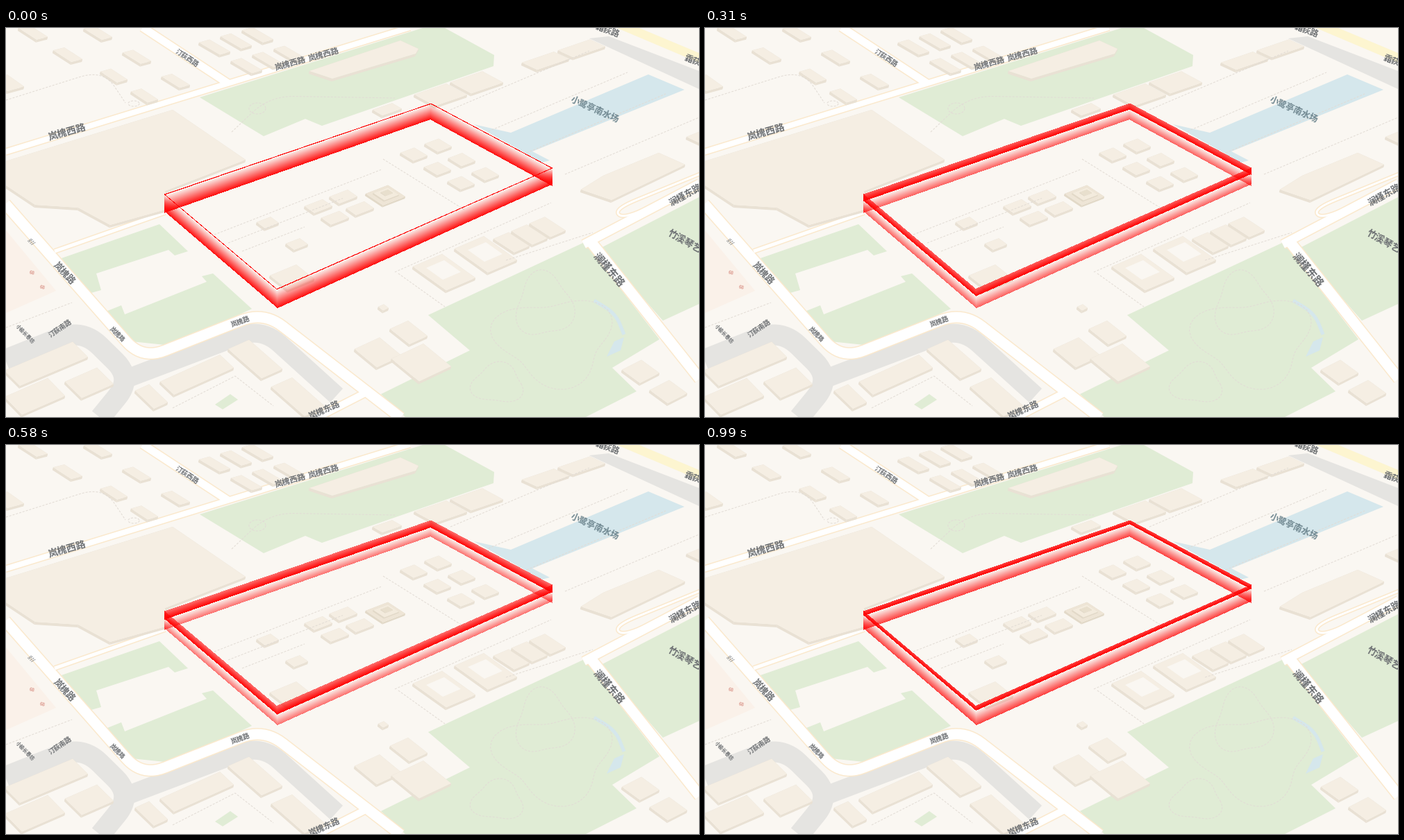
Animation of 998 by 561 pixels, one loop 1060 ms. Source, as a matplotlib script:

```python
import numpy as np
import matplotlib.pyplot as plt
from matplotlib.animation import FuncAnimation
from matplotlib.collections import PolyCollection

W, H, DPI = 998, 561, 100
PT = 72 / DPI
LOOP, TICK = 1060, 10

LAND, GREEN, WATER = "#faf7f2", "#e0ecd5", "#d5e7ec"
ROOF, SIDE, GREY = "#f5eee3", "#e9e1d4", "#e5e4e1"
EDGE, PATH, INK = "#fbe9cd", "#e2dcd5", "#6c6f72"

fig = plt.figure(figsize=(W / DPI, H / DPI), dpi=DPI, facecolor=LAND)
ax = fig.add_axes([0, 0, 1, 1])
ax.set_axis_off()
rng = np.random.default_rng(4)


def area(color, *points):
    ax.fill(*zip(*points), color=color, lw=0, zorder=1)


def rounded(points, radius=35):
    """Polyline whose inner corners are replaced by quadratic curves."""
    points = np.array(points, float)
    path = [points[0]]
    t = np.linspace(0, 1, 12)[:, None]
    for before, corner, after in zip(points, points[1:], points[2:]):
        a, b = (corner + (p - corner) * min(0.5, radius / np.hypot(*(p - corner)))
                for p in (before, after))
        path.extend((1 - t) ** 2 * a + 2 * t * (1 - t) * corner + t ** 2 * b)
    return path + [points[-1]]


def stroke(points, width, color, z, dash=None):
    ax.plot(*zip(*points), color=color, lw=width * PT, zorder=z,
            solid_joinstyle="round", solid_capstyle="butt",
            ls=(0, dash) if dash else "-")


def road(width, *points):
    path = rounded(points)
    stroke(path, width + 3, EDGE, 2)
    stroke(path, width, "white", 3)


def footpath(*points):
    stroke(points, 1, PATH, 5, (3, 2))


def loop_path(x, y, rx, ry, wobble=0.0):
    turn = np.linspace(0, 2 * np.pi, 50)
    r = 1 + wobble * np.sin(3 * turn + rng.uniform(0, 6))
    footpath(*zip(x + rx * r * np.cos(turn), y + ry * r * np.sin(turn)))


def label(x, y, text, size, angle, color=INK):
    ax.text(x, y, text, fontsize=size * PT, rotation=angle, color=color,
            family="Noto Sans CJK JP", weight="bold", ha="center", va="center",
            rotation_mode="anchor", zorder=6, clip_on=True)


def raised(*shapes, roof=ROOF, side=SIDE, drop=(-1, 4)):
    """Flat roofs with their side walls showing below."""
    polys, colors = [], []
    for shape in shapes:
        top = np.asarray(shape, float)
        for p, q in zip(top, np.roll(top, -1, axis=0)):
            polys.append([p, q, q + drop, p + drop])
            colors.append(side)
        polys.append(top)
        colors.append(roof)
    ax.add_collection(PolyCollection(polys, facecolors=colors, lw=0, zorder=4))


def estate(x, y, a, b, cols=1, rows=1, gap=0, **style):
    """Grid of equal blocks on the tilted street directions."""
    origin = np.array([x, y], float)
    u = np.array([1, -(0.25 + 0.00035 * y + 0.0001 * x)])
    v = np.array([1, 0.65 + 0.0007 * y - 0.0003 * x])
    corners = [origin + i * (a + gap) * u + j * (b + gap) * v
               for j in range(rows) for i in range(cols)]
    raised(*([p, p + a * u, p + a * u + b * v, p + b * v] for p in corners), **style)


# Parks, water and paved ground
area(GREEN, (279, 100), (600, 0), (632, 0), (703, 39), (702, 55), (455, 141),
     (431, 131), (371, 156))
area(GREEN, (80, 332), (221, 283), (262, 322), (243, 328), (234, 320),
     (130, 354), (137, 378), (119, 383))
area(GREEN, (146, 408), (166, 400), (171, 413), (289, 366), (282, 358),
     (298, 354), (354, 405), (238, 458), (181, 452))
area(GREEN, (608, 414), (833, 309), (941, 449), (873, 490), (908, 524),
     (835, 561), (575, 561), (540, 528), (668, 465))
area(GREEN, (855, 318), (998, 244), (998, 398), (946, 422))
area(GREEN, (301, 543), (323, 528), (334, 536), (312, 550))
area(WATER, (674, 139), (727, 151), (925, 67), (977, 89), (758, 178),
     (783, 191), (772, 194))
area(WATER, (876, 452), (890, 446), (885, 465), (865, 474))
stroke(rounded([(847, 393), (878, 412), (890, 442)]), 5, WATER, 2)
area("#faf1e9", (0, 292), (72, 379), (0, 411))
area(GREY, (840, 15), (868, 12), (998, 62), (998, 88))
area("#fdf5d0", (880, 0), (912, 0), (998, 36), (998, 50))
stroke(rounded([(-10, 482), (110, 434), (182, 505), (125, 575)]), 30, GREY, 1)
stroke(rounded([(178, 504), (368, 432), (476, 530)]), 27, GREY, 1)

# Streets
road(8, (-5, 180), (585, -2))
road(11, (192, -4), (320, 80))
road(15, (-5, 249), (196, 478), (371, 409), (580, 571))
road(5, (70, 322), (229, 266))
road(12, (832, 312), (1003, 222))
road(15, (842, 308), (1003, 511))
road(3, (1003, 209), (876, 261), (888, 276), (965, 240))
road(10, (520, 525), (440, 566))

# Buildings, north to south
raised([(0, 192), (240, 118), (345, 190), (229, 235), (229, 262), (150, 284),
        (104, 259), (42, 255), (0, 227)],
       [(437, 62), (568, 18), (594, 30), (590, 37), (470, 73)],
       [(828, 233), (860, 213), (940, 180), (978, 197), (872, 248)])
estate(18, 0, 16, 26, rows=2, gap=24)
estate(112, 1, 15, 26, rows=3, gap=30)
estate(136, 63, 15, 24, rows=2, gap=20)
estate(278, 21, 15, 30, cols=3, rows=2, gap=16)
estate(-22, 74, 24, 24)
estate(743, 50, 46, 22, cols=2, gap=6)
estate(528, 118, 28, 14)
estate(588, 96, 46, 30, cols=2, gap=6)
estate(980, 157, 30, 20)

estate(568, 180, 20, 19, cols=2, rows=3, gap=15)
estate(430, 257, 26, 14, cols=2, rows=2, gap=10)
estate(361, 280, 20, 12, rows=2, gap=30)
estate(380, 357, 38, 26)
for inset, tone in zip((0, 1, 2), ("#eee5d6", "#f3ebdd", "#e8dfcd")):
    estate(518 + 11 * inset, 239 - inset, 32 - 11 * inset, 25 - 9 * inset,
           roof=tone, side="#e2d9c8", drop=(-1, 3 - inset))

estate(586, 344, 42, 48, cols=2, gap=18)
estate(605, 346, 26, 24, cols=2, gap=34, roof=LAND, side=LAND, drop=(0, 0))
estate(702, 304, 22, 30, cols=3, gap=4)
estate(536, 402, 8, 7)
estate(553, 434, 26, 28)
estate(502, 463, 36, 32)
estate(555, 477, 46, 40)
estate(887, 493, 28, 26, rows=2, gap=14)

estate(-2, 494, 98, 22)
estate(-2, 532, 62, 25)
estate(85, 510, 46, 24)
estate(186, 523, 20, 27)
estate(222, 510, 86, 20)
estate(320, 463, 30, 48, rows=2, gap=14)

# Footpaths
loop_path(362, 116, 12, 8)
loop_path(184, 109, 8, 4)
loop_path(708, 513, 36, 28, 0.15)
loop_path(775, 400, 40, 45, 0.15)
loop_path(790, 450, 80, 60, 0.2)
footpath(*rounded([(0, 104), (140, 60), (172, 108)]))
footpath(*rounded([(325, 150), (380, 98), (560, 101)]))
footpath((543, 189), (660, 262))
footpath((560, 352), (785, 252))
footpath((720, 335), (845, 295))
footpath((565, 354), (632, 402))
footpath((0, 432), (95, 396))
footpath((240, 548), (330, 502), (385, 545))
for k in range(3):
    x, y, run = 300 + 20 * k, 298 + 12 * k, 240 - 75 * k
    footpath((x, y), (x + run, y - 0.39 * run))
for k in range(4):
    x, y = 640 + 55 * k, 118 + 31 * k
    footpath((x, y), (x + 200, y - 85))

# Street names
label(88, 150, "岚槐西路", 14, 16)
for k in range(2):
    label(410 + 48 * k, 51 - 13 * k, "岚槐西路", 11.5, 16)
label(261, 43, "汀荻西路", 9.5, -34)
label(84, 354, "岚槐路", 13, -47)
label(160, 442, "岚槐路", 9, -45)
label(338, 423, "岚槐路", 9.5, 20)
label(868, 349, "澜槿东路", 15, -49)
label(979, 241, "澜槿东路", 13, 29)
label(459, 551, "岚槐东路", 12, 24)
label(848, 118, "小鹭亭南水场", 12.5, -24, "#6f8790")
label(977, 308, "竹溪琴艺", 13.5, -29)
label(28, 441, "小榆长春坊", 7, -46)
label(78, 433, "汀荻南路", 9.5, 34)
label(866, 4, "霜荻路", 12, -20)
label(989, 47, "霜荻", 12, -20)
label(36, 308, "////", 7, -45)
for k in range(2):
    label(37 + 15 * k, 353 + 21 * k, "68", 7, -15, "#dd9d92")
stroke([(0, 560.5), (W, 560.5)], 1, "#c9c7c4", 6)

# Glowing wall: height above ground (0..1) of each pixel, per side
X0, Y0, X1, Y1 = 224, 104, 792, 408
gx, gy = np.meshgrid(np.arange(X0, X1) + 0.5, np.arange(Y0, Y1) + 0.5)
TOP = [(228.5, 239.5), (612, 108.5), (786.5, 201.5), (390, 376)]
BASE = [(230, 266), (611, 132), (784, 226.5), (391, 404)]


def edge_y(p, q):
    return p[1] + (gx - p[0]) * (q[1] - p[1]) / (q[0] - p[0])


def side_height(i):
    j = (i + 1) % 4
    top, base = edge_y(TOP[i], TOP[j]), edge_y(BASE[i], BASE[j])
    left, right = sorted((TOP[i][0], TOP[j][0]))
    height = (base - gy) / (base - top)
    inside = (gx >= left) & (gx <= right) & (height >= 0) & (height <= 1)
    return np.where(inside, height, np.nan)


SIDES = [side_height(i) for i in range(4)]


def wall_image(phase):
    clear = np.ones_like(gx)
    for height in SIDES:
        clear *= 1 - np.nan_to_num(np.mod(phase - height, 1))
    image = np.zeros(gx.shape + (4,))
    image[..., 0] = 1
    image[..., 3] = 1 - clear
    return image


# The pulse climbs the wall three times, in 6, 5 and 5 even steps
PHASES = [(0.95 + i / steps) % 1 for steps in (6, 5, 5) for i in range(steps)]
SHORT_STEPS = (1, 2, 3, 6, 8, 13)
HOLDS = [60 if i in SHORT_STEPS else 70 for i in range(len(PHASES))]
ENDS = np.cumsum(HOLDS)
WALLS = [wall_image(p) for p in PHASES]

wall = ax.imshow(WALLS[0], extent=(X0, X1, Y1, Y0), interpolation="nearest",
                 aspect="auto", zorder=7)
ax.set_xlim(0, W)
ax.set_ylim(H, 0)


def update(n):
    wall.set_data(WALLS[np.searchsorted(ENDS, n * TICK, side="right")])
    return (wall,)


anim = FuncAnimation(fig, update, frames=LOOP // TICK, interval=TICK,
                     repeat=True, repeat_delay=0, blit=False)
plt.show()
```
